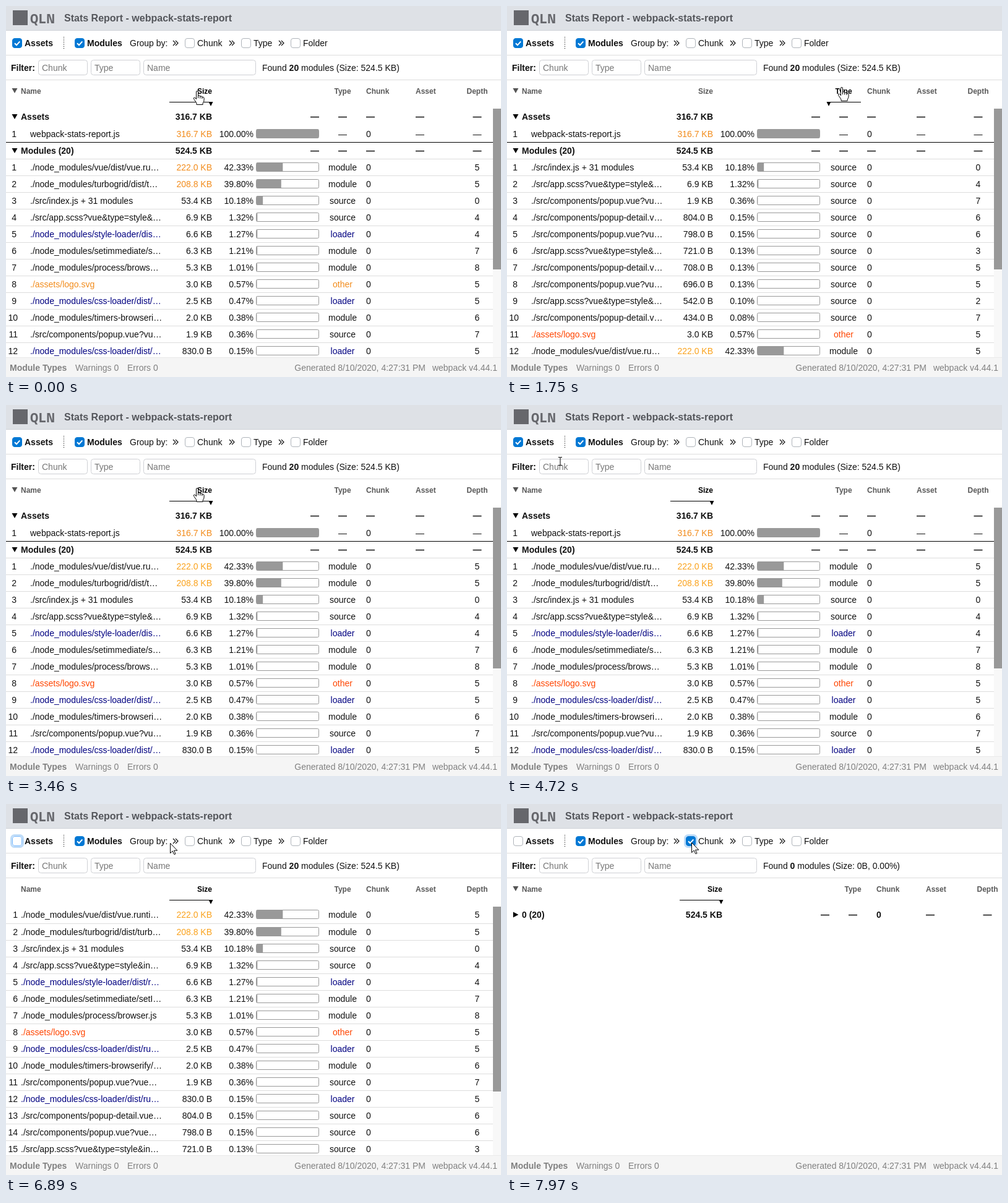
Write an HTML page that moves like this. It is 800 px wide and 600 px high and loops after 8 s.

```html
<!DOCTYPE html>
<html lang="en">
<head>
<meta charset="utf-8">
<title>Stats Report</title>
<style>
  html, body { margin: 0; width: 100%; height: 100%; overflow: hidden; background: #fff; }
  svg { display: block; width: 800px; height: 600px; font: 14px "Liberation Sans", Arial, sans-serif; }
  text { white-space: pre; }
</style>
</head>
<body>
<svg id="stage" viewBox="0 0 800 600"></svg>
<script>
const LOOP = 8000;
const stage = document.getElementById("stage");

function add(parent, tag, attrs = {}, text) {
  const node = document.createElementNS("http://www.w3.org/2000/svg", tag);
  for (const k in attrs) node.setAttribute(k, attrs[k]);
  if (text !== undefined) node.textContent = text;
  return parent.appendChild(node);
}
const group = parent => add(parent, "g");
const box = (g, x, y, width, height, fill, more) =>
  add(g, "rect", { x, y, width, height, fill, ...more });
const path = (g, d, fill, stroke, more) =>
  add(g, "path", { d, fill: fill || "none", stroke: stroke || "none", ...more });
const label = (g, x, y, str, more) => add(g, "text", { x, y, fill: "#111", ...more }, str);
const BOLD = { "font-weight": 700 };
const END = { "text-anchor": "end" };
const MID = { "text-anchor": "middle" };
const show = (node, on) => node.setAttribute("display", on ? "inline" : "none");

// ---- data: "|" marks where a name is cut when the column is indented
const modules = [
  ["./node_modules/vue/dist/vue.ru|nti…", "222.0 KB", 42.33, "module", 5],
  ["./node_modules/turbogrid/dist/t|urb…", "208.8 KB", 39.8, "module", 5],
  ["./src/index.js + 31 modules", "53.4 KB", 10.18, "source", 0],
  ["./src/app.scss?vue&type=style&|in…", "6.9 KB", 1.32, "source", 4],
  ["./node_modules/style-loader/dis|t/r…", "6.6 KB", 1.27, "loader", 4],
  ["./node_modules/setimmediate/s|etI…", "6.3 KB", 1.21, "module", 7],
  ["./node_modules/process/brows|er.js", "5.3 KB", 1.01, "module", 8],
  ["./assets/logo.svg", "3.0 KB", 0.57, "other", 5],
  ["./node_modules/css-loader/dist/|ru…", "2.5 KB", 0.47, "loader", 5],
  ["./node_modules/timers-browseri|fy/…", "2.0 KB", 0.38, "module", 6],
  ["./src/components/popup.vue?vu|e…", "1.9 KB", 0.36, "source", 7],
  ["./node_modules/css-loader/dist/|ru…", "830.0 B", 0.15, "loader", 5],
  ["./src/components/popup-detail.v|ue…", "804.0 B", 0.15, "source", 6],
  ["./src/components/popup.vue?vu|e…", "798.0 B", 0.15, "source", 6],
  ["./src/app.scss?vue&type=style&|in…", "721.0 B", 0.13, "source", 3],
  ["./src/components/popup-detail.v|ue…", "708.0 B", 0.13, "source", 5],
  ["./src/components/popup.vue?vu|e…", "696.0 B", 0.13, "source", 5],
  ["./src/app.scss?vue&type=style&|in…", "542.0 B", 0.1, "source", 2],
  ["./src/components/popup-detail.v|ue…", "434.0 B", 0.08, "source", 7]
];
const byType = [...modules].sort((a, b) => b[3].localeCompare(a[3]));

// ---- table parts
const baseline = k => 185 + 27 * k - (k < 1 ? 1 : 0);

function triangle(g, y, open = true, fill = "#000") {
  path(g, open ? `M9.5 ${y - 4}h9l-4.5 8z` : `M10 ${y - 4.5}v9l8.5-4.5z`, fill);
}

function header(g, sort, dx, grouped) {
  const cell = (x, str, more) => label(g, x + dx, 142, str,
    { ...BOLD, "font-size": 12, ...more, fill: str === sort ? "#000" : "#595959" });
  if (grouped) triangle(g, 137, true, "#555");
  label(g, 24, 142, "Name", { ...BOLD, "font-size": 12, fill: "#595959" });
  cell(333, "Size", END);
  cell(544, "Type", MID);
  cell(582, "Chunk");
  cell(662, "Asset");
  cell(761.5, "Depth", MID);
  const [x, width, tip] = sort === "Size" ? [264, 70, 327.5] : [517, 55, 516.5];
  box(g, x + dx, 155, width, 1, "#000");
  path(g, `M${tip + dx} 155h7l-3.5 7z`, "#000");
}

function bar(g, k, percent) {
  const y = baseline(k) - 12.5;
  label(g, 400, baseline(k), percent.toFixed(2) + "%", END);
  box(g, 405, y, percent, 14, "#999");
  box(g, 404.5, y, 101, 14, "none", { rx: 2, stroke: "#999" });
}

function groupRow(g, k, name, size, dx = 0, chunk = "—", open = true) {
  const y = baseline(k);
  triangle(g, y - 5, open);
  label(g, 24, y, name, BOLD);
  label(g, 333 + dx, y, size, { ...BOLD, ...END });
  label(g, 506 + dx, y, "—", { ...BOLD, ...END });
  label(g, 544 + dx, y, "—", { ...BOLD, ...MID });
  label(g, 582 + dx, y, chunk, BOLD);
  label(g, 662 + dx, y, "—", BOLD);
  label(g, 761.5 + dx, y, "—", { ...BOLD, ...MID });
}

function assetRow(g, k) {
  const y = baseline(k);
  label(g, 17, y, "1", END);
  label(g, 39, y, "webpack-stats-report.js");
  label(g, 333, y, "316.7 KB", { ...END, fill: "#f28c1c" });
  bar(g, k, 100);
  label(g, 544, y, "—", MID);
  label(g, 582, y, "0");
  label(g, 662, y, "—");
  label(g, 761.5, y, "—", MID);
}

function moduleRow(g, k, n, row, indented, tone) {
  const [name, size, percent, type, depth] = row;
  const y = baseline(k);
  const fill = { loader: "#000080", other: tone.other }[type] || "#111";
  const [head, tail] = name.split("|");
  const shown = tail === undefined ? head : indented ? head + "…" : head + tail;
  label(g, indented && n < 10 ? 17 : 19, y, n, END);
  label(g, indented ? 39 : 24, y, shown, { fill });
  label(g, 333, y, size, { ...END, fill: parseFloat(size) > 100 && size.endsWith("KB") ? tone.size : "#111" });
  bar(g, k, percent);
  label(g, 544, y, type, { ...MID, fill });
  label(g, 582, y, "0");
  label(g, 761.5, y, depth, MID);
}

function found(g, count, rest) {
  const t = add(g, "text", { x: 414, y: 105, fill: "#111" });
  add(t, "tspan", {}, "Found ");
  add(t, "tspan", BOLD, count);
  add(t, "tspan", {}, " modules " + rest);
}

function table(sort, rows, grouped, tone) {
  const g = group(stage);
  header(g, sort, 0, grouped);
  found(g, "20", "(Size: 524.5 KB)");
  const first = grouped ? 3 : 0;
  for (let k = 0; k < 14; k++) {
    const dark = grouped && k === 1;
    if (!grouped || k > 0) box(g, 0, 193 + 27 * k, 787, 1, dark ? "#000" : "#ddd");
  }
  if (grouped) {
    groupRow(g, 0, "Assets", "316.7 KB");
    assetRow(g, 1);
    groupRow(g, 2, "Modules (20)", "524.5 KB");
  }
  rows.slice(0, 15 - first).forEach((row, i) => moduleRow(g, i + first, i + 1, row, grouped, tone));
  box(g, 787, 166, 13, 403, "#f8f8f8");
  box(g, 787, 166, 13, grouped ? 260 : 299, "#999");
  return g;
}

function chunkTable() {
  const g = group(stage);
  header(g, "Size", 15, true);
  found(g, "0", "(Size: 0B, 0.00%)");
  groupRow(g, 0, "0 (20)", "524.5 KB", 15, "0", false);
  return g;
}

const soft = { size: "#f28c1c", other: "#f28c1c" };
const vivid = { size: "#faa21c", other: "#ff4500" };
const views = [
  [0, table("Size", modules, true, soft)],
  [1750, table("Type", byType, true, vivid)],
  [3460, table("Size", modules, true, vivid)],
  [5410, table("Size", modules, false, vivid)],
  [7970, chunkTable()]
];

// ---- fixed frame around the table
const frame = group(stage);
box(frame, 0, 0, 800, 40, "#dee1e6");
box(frame, 0, 39, 800, 1, "#d0d3d8");
box(frame, 11, 7, 24, 24, "#66676c");
label(frame, 39, 28, "QLN", { "font-family": '"Noto Sans Mono", monospace', "font-size": 22, "font-weight": 600, fill: "#66676c" });
label(frame, 94, 25, "Stats Report - webpack-stats-report", { ...BOLD, "font-size": 16, fill: "#54565b" });
box(frame, 0, 79, 800, 1, "#ddd");
box(frame, 0, 119, 800, 1, "#ddd");
label(frame, 30, 65, "Assets", BOLD);
path(frame, "M93.5 50v20", "", "#000", { "stroke-dasharray": "1 2" });
label(frame, 131, 65, "Modules", BOLD);
label(frame, 200, 65, "Group by:");
for (const x of [270, 361, 441])
  path(frame, `M${x} 56l4 4-4 4m4-8l4 4-4 4`, "", "#111", { "stroke-width": 1.2 });
label(frame, 309, 65, "Chunk");
label(frame, 400, 65, "Type");
label(frame, 480, 65, "Folder");
label(frame, 8, 105, "Filter:", BOLD);
const inputs = [[52, 80, "Chunk"], [137, 80, "Type"], [222, 182, "Name"]];
for (const [x, width, hint] of inputs) {
  box(frame, x + 0.5, 87.5, width - 1, 24, "#fff", { rx: 4, stroke: "#ced0d4" });
  label(frame, x + 6, 105, hint, { fill: "#777" });
}
box(frame, 0, 569, 800, 31, "#f5f5f5");
box(frame, 0, 568, 800, 1, "#eaeaea");
const foot = (x, str, more) => label(frame, x, 590, str, { fill: "#808080", ...more });
foot(6, "Module Types", BOLD);
foot(112, "Warnings 0");
foot(196, "Errors 0");
foot(678, "Generated 8/10/2020, 4:27:31 PM", END);
foot(794, "webpack v4.44.1", END);

// ---- check boxes
function checkbox(x) {
  const g = group(stage);
  const ring = box(g, x - 1.5, 50.5, 19, 19, "none", { rx: 5, stroke: "#bfdcf8", "stroke-width": 3 });
  const square = box(g, x + 0.5, 52.5, 15, 15, "#fff", { rx: 3.5 });
  const tick = path(g, `M${x + 4} 60.3l3 3 5.3-6`, "", "#fff", { "stroke-width": 2 });
  return (checked, focus, hover) => {
    show(ring, focus);
    show(tick, checked);
    square.setAttribute("fill", checked ? "#0078d4" : "#fff");
    square.setAttribute("stroke", checked ? "#0078d4" : hover ? "#777" : focus ? "#80bdff" : "#b0b5bb");
  };
}
const assetsBox = checkbox(10);
checkbox(111)(true);
const chunkBox = checkbox(289);
checkbox(380)(false);
checkbox(460)(false);

// ---- pointer
const press = group(stage);
add(press, "circle", { r: 11, fill: "none", stroke: "#000" });
add(press, "circle", { r: 10, fill: "none", stroke: "#fff" });
const pointer = group(stage);
const shapes = {
  arrow: path(pointer, "M.5.5V16.5L4.2 13 6.9 18.6 9 17.7 6.5 12.2H11.8Z", "#fff", "#000"),
  hand: path(pointer, "M-1.5 13V2q0-1.5 1.5-1.5T1.5 2V8q3-1 3.2 1 3-.8 3.2 1.2 3-.6 3.2 1.8V15q0 3-2 5V22.5H-1V20L-5.3 13.5q-1-2 .6-2.6 1.4 0 3.2 2.8ZM1.5 8v4M4.7 9v3.5M7.9 10.2V13", "#fff", "#000"),
  beam: path(pointer, "M-3-6.5h2.2L0-6l.8-.5H3M0-6V6M-3 6.5h2.2L0 6l.8.5H3", "", "#000")
};

// first step, last step, places as x y pairs
const moves = [
  [0, 0, "309 137"],
  [670, 1360, "320 142  350 144  388 144  422 143  451 141  477 140  501 138  520 135  534 132  541 131"],
  [2530, 3160, "522 132  472 134  417 136  365 137  338 140  323 138  314 136  310 135  309 134"],
  [4390, 5020, "300 133  258 125  200 114  140 102  86 91  55 78  35 67  25 61  21 58"],
  [6280, 7040, "24 59  42 61  70 63  105 63  143 63  180 63  213 63  242 63  265 63  288 63  303 63"],
  [7130, 7130, "308 62"],
  [7370, 7430, "303 62  298 62"]
].map(([from, to, list]) => ({ from, to, spots: list.split("  ").map(p => p.split(" ").map(Number)) }));

const latest = (list, at, t) => list.filter(item => at(item) <= t).pop();

function pointerAt(t) {
  const { from, to, spots } = latest(moves, m => m.from, t);
  const last = spots.length - 1;
  const step = last ? Math.floor((t - from) / (to - from) * last + 1e-6) : 0;
  return spots[Math.min(last, step)];
}

function shapeAt(x, y) {
  if (y >= 87 && y < 112 && inputs.some(([left, width]) => x >= left && x < left + width)) return "beam";
  if (y >= 120 && y < 166 && (x < 336 || x > 517)) return "hand";
  return "arrow";
}

const presses = [[1600, 1750], [3310, 3460], [5260, 5340], [7820, 7970]];

function draw(t) {
  const current = latest(views, v => v[0], t);
  for (const v of views) show(v[1], v === current);
  const [x, y] = pointerAt(t);
  const place = `translate(${x} ${y})`;
  const shape = shapeAt(x, y);
  for (const name in shapes) show(shapes[name], name === shape);
  pointer.setAttribute("transform", place);
  press.setAttribute("transform", place);
  show(press, presses.some(([from, to]) => t >= from && t < to));
  assetsBox(t < 5340, t >= 5340 && t < 7820, x < 28);
  chunkBox(t >= 7970, t >= 7970, t >= 7130);
}

const start = performance.now();
function tick() {
  draw((performance.now() - start) % LOOP);
  requestAnimationFrame(tick);
}
tick();
</script>
</body>
</html>
```
